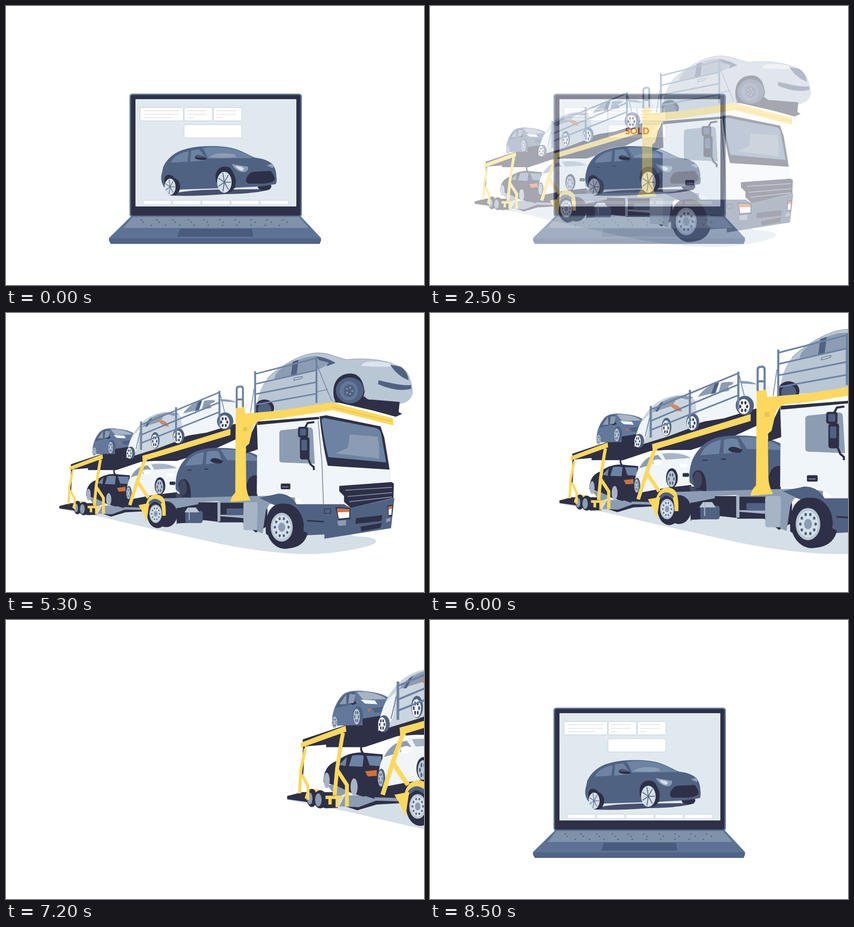
An HTML page that plays this animation: 917x611 px, repeating every 8.6 s.

```html
<!DOCTYPE html>
<html lang="en">
<head>
<meta charset="utf-8">
<title>Car sold and delivered</title>
<style>
html, body { margin: 0; width: 100%; height: 100%; overflow: hidden; background: #fff; }
svg { display: block; }
text { font: 900 20px Lato, sans-serif; fill: #cb5b26; }
</style>
</head>
<body>
<svg width="917" height="611" viewBox="0 0 917 611">
  <g id="laptop"></g>
  <g id="scene"><rect width="917" height="611" fill="#fff"/><g id="truck"></g></g>
</svg>
<script>
const NAVY = '#2e3047', BLUE = '#506282', MID = '#6c83a4', STEEL = '#8c9db3', GREY = '#a7b4c5',
  PALE = '#b9c6d4', MIST = '#d5dfe8', ICE = '#f0f5fa', YELLOW = '#fdd85c', ORANGE = '#d2703a';

// Shape helpers, each returning SVG markup
const area = (fill, d) => `<path fill="${fill}" d="${d}"/>`;
const line = (color, width, d) => `<path fill="none" stroke="${color}" stroke-width="${width}" stroke-linejoin="round" d="${d}"/>`;
const oval = (fill, x, y, rx, ry) => `<ellipse fill="${fill}" cx="${x}" cy="${y}" rx="${rx}" ry="${ry}"/>`;
const box = (fill, x, y, w, h, r = 0, stroke = 'none') =>
  `<rect x="${x}" y="${y}" width="${w}" height="${h}" rx="${r}" fill="${fill}" stroke="${stroke}"/>`;
const repeat = (n, fn) => Array.from({ length: n }, (_, i) => fn(i)).join('');
const ring = (n, x, y, rx, ry, fn) => repeat(n, i => {
  const a = i / n * 2 * Math.PI;
  return fn(x + rx * Math.cos(a), y + ry * Math.sin(a));
});
const spoked = (x, y, rx, ry) => oval(MIST, x, y, rx, ry) +
  ring(7, x, y, rx * .9, ry * .9, (px, py) => line(BLUE, rx / 9, `M${x} ${y}L${px} ${py}`));
const carRim = (x, y, rx, ry, rim = PALE, hole = BLUE) => oval(rim, x, y, rx, ry) +
  ring(6, x, y, rx * .58, ry * .58, (px, py) => oval(hole, px, py, rx * .17, ry * .22));
const truckRim = (x, y, rx, ry) => oval(PALE, x, y, rx, ry) + oval(MIST, x, y, rx * .82, ry * .82) +
  ring(10, x, y, rx * .62, ry * .62, (px, py) => oval(BLUE, px, py, rx * .1, ry * .1)) +
  oval(STEEL, x, y, rx * .32, ry * .32);
const rails = (x1, x2, pairs) => pairs.map(([a, b]) => line(MID, 3, `M${x1} ${a}L${x2} ${b}`)).join('');
const posts = list => list.map(([x, top, bottom]) => line(MID, 4, `M${x} ${top}V${bottom}`)).join('');

const panel = (x, y, w, h) => box('#fff', x, y, w, h, 3, '#c0cbd8');
const note = (x, w, indent, full, last) => panel(x, 222.5, w, 29) +
  line('#cbd2da', 1, `M${x + indent} 229.5h${full}m${-full} 7.5h${full}m${-full} 7.5h${last}`);
const keys = (x, y, step) => repeat(10, i => box('#596985', x + i * step, y, 4, 2.5, 1));

const screenCar =
  area('#474f6e', 'M358 415C378 405 420 403 460 402L581 401C560 408 520 412 480 412C440 415 400 417 358 415Z') +
  oval(NAVY, 567, 395, 15, 9) +
  area(BLUE, 'M345 352C352 337 366 323 385 316Q408 308 436 307C462 306 482 307 500 312C520 318 534 327 546 332Q573 335 585 347Q593 358 593 372Q595 384 592 390L560 395L504 398L380 402L348 398C340 388 339 376 342 366Z') +
  area(MID, 'M362 343C366 331 381 321 401 318L398 341Z M406 316L424 314Q433 325 439 338L404 341Z M431 311C462 306 488 309 510 317Q530 325 544 333L443 334Q438 320 431 311Z') +
  area(STEEL, 'M446 331C455 322 482 320 502 325L505 331Q475 334 446 331Z') +
  area(NAVY, 'M414 333C414 325 426 325 432 330L440 334L438 337Q418 338 414 333Z') +
  area(BLUE, 'M415 331Q420 326 427 328L433 332Z') +
  area(NAVY, 'M461 386C456 362 467 350 483 352C496 353 502 365 503 398L480 408Z M348 388Q345 373 354 370C369 367 374 383 376 402L355 411Z') +
  oval(NAVY, 486, 384, 18, 25) + spoked(479, 386, 16, 23) +
  oval(NAVY, 367, 396, 15, 19) + spoked(360, 396, 12, 18) +
  area(NAVY, 'M527 378Q533 364 543 363L581 361Q591 374 589 381Q585 388 560 389H532Q525 387 527 378Z') +
  area(STEEL, 'M495 346L531 352Q532 364 519 364Q503 361 495 346Z M572 349L584 345Q589 352 585 355Z') +
  area(MIST, 'M503 350L517 352Q526 357 517 361Q507 358 503 350Z');

laptop.innerHTML =
  box('#5d7294', 271, 192, 378, 270, 6) + box(NAVY, 274, 195, 372, 264, 4) + box('#e1e9f0', 284, 204, 353, 235, 1) +
  note(294, 95.5, 8, 78, 62) + note(391, 62.5, 6, 43, 14) + note(455, 62.5, 6, 43, 14) +
  panel(390.5, 260, 127, 29) + '<text id="label" x="428 439 455 466" y="281.3"></text>' +
  repeat(5, i => panel(300.8 + i * 64.2, 425.5, 62.5, 9.7)) + screenCar +
  area('#5d7294', 'M274 461H647L691 508V511H226V508Z') +
  area('#4f6488', 'M226 509H691V514L688 521H230L226 514Z') +
  area('#8092aa', 'M278 462H643L664 486H258Z') +
  keys(295, 467, 34.4) + keys(299, 472.5, 35.1) + keys(317, 479, 31.2) +
  area('#495c7c', 'M381 488H540L542 505H376Z');

const ground = area(MIST, 'M98 434L187 451L281 473L350 488L430 506Q540 528 620 528C670 528 748 514 758 504Q764 492 715 491L600 440L350 420L130 430Z');

const hatchback =
  area('#63799b', 'M167 320C166 300 173 284 183 273C190 266 206 265 218 267Q245 269 257 279L254 309L214 319Z') +
  area(BLUE, 'M172 293Q180 274 193 269L202 268L204 285Z M228 293L251 290L247 300L233 300Z') +
  area(NAVY, 'M214 309L252 303V314L214 319Z M193 285Q200 278 205 286L199 288Z') +
  area(STEEL, 'M178 287L189 272L189 287Z M192 286L194 271L203 272Q202 282 200 285Z') +
  area(GREY, 'M205 268Q235 267 251 279L215 280Z') +
  area(ICE, 'M211 280L233 281L237 287L218 286Z') + oval(ORANGE, 224, 296, 2, 2.5) +
  oval(BLUE, 207, 305, 8, 15) + carRim(205, 306, 5, 12) + carRim(171, 315, 4, 9);

const whiteUpper =
  area(ICE, 'M341 285C346 260 349 240 366 224C380 209 400 206 425 205Q469 204 490 214L492 226L464 257L405 275Z') +
  area(STEEL, 'M356 235Q372 213 396 208L390 227Z M400 209Q411 206 423 208L414 224L395 227Z M432 206Q454 204 467 212L438 210Z') +
  area(BLUE, 'M388 210L396 208L389 228L381 230Z') + oval('#fff', 424, 218, 11, 6) +
  oval(BLUE, 444, 251, 17, 18) + carRim(442, 253, 11, 14, ICE, NAVY);

const paleUpper =
  area('#cad5df', 'M238 328C240 300 249 278 266 258C283 239 305 232 326 232Q342 232 352 242L356 288L300 309Z') +
  area(STEEL, 'M270 264Q287 239 319 234L309 252Z M313 234Q335 231 349 236L336 240Z') +
  area(BLUE, 'M286 247L292 243L282 262L277 263Z') +
  area(ICE, 'M238 325Q241 300 251 282L265 268L262 305L250 328Z') +
  area('#cf8a62', 'M303 249Q321 247 327 262Q315 264 303 249Z') +
  oval(BLUE, 298, 291, 9, 17) + carRim(297, 293, 7, 14, ICE, NAVY) +
  oval(BLUE, 347, 282, 12, 16) + carRim(345, 284, 9, 13, ICE, NAVY) +
  oval(BLUE, 247, 317, 9, 13) + carRim(244, 318, 6, 11, ICE, NAVY);

const sedan =
  area(NAVY, 'M154 407C154 388 162 378 175 374Q191 361 212 361L245 364V412L216 429L198 424L174 412Z') +
  area(MID, 'M178 380L190 368L188 382Z M193 382L198 366Q208 364 216 366L214 383Z M220 366L243 367V382L225 381Z') +
  area(ORANGE, 'M218 390L236 388V397L222 398Z') +
  oval(GREY, 159, 404, 4.5, 12) + oval(GREY, 201, 414, 5.5, 13);

const suv =
  area(ICE, 'M238 402C239 375 250 353 270 343Q292 335 322 339Q344 341 351 352V395L310 402L246 414Z') +
  area(STEEL, 'M247 368Q256 350 271 345L268 362Z M274 345L282 343L289 352L272 361Z') +
  area(GREY, 'M290 341Q325 337 343 349L296 352Z') +
  area('#fff', 'M273 354Q282 348 291 355L285 362H274Z M322 359L339 361L334 367L323 366Z') +
  box(NAVY, 328, 377, 12, 7, 2) +
  oval(NAVY, 308, 386, 11, 18) + carRim(307, 388, 8, 15) +
  oval(BLUE, 243, 400, 6, 14) + carRim(242, 401, 4, 12);

const blueLower =
  area(BLUE, 'M341 394C339 365 346 346 361 330C378 312 398 307 430 307Q478 306 511 322V408L360 411Z') +
  area(MID, 'M361 344Q371 320 400 315L396 341Z M405 315Q419 311 430 314L439 337L404 341Z M434 310Q481 308 510 327V334L448 332Z') +
  area(NAVY, 'M413 333Q417 325 431 330L440 334L436 339Q417 340 413 333Z') +
  line(NAVY, 2, 'M365 353h9M400 351h9') +
  area(NAVY, 'M346 383Q350 370 361 372Q374 380 372 411L353 408Z') + oval('#40475f', 356, 390, 8, 16) +
  area(NAVY, 'M487 407Q486 360 511 364V407Z');

const topCar =
  area(PALE, 'M508 232C511 203 517 181 532 162C551 143 585 121 612 113Q642 104 670 115L697 123Q749 117 793 131Q824 139 830 163Q837 183 835 195C831 208 820 214 806 216L740 206L665 216L600 226Z') +
  line(STEEL, 1, 'M532 162C551 143 585 121 612 113Q642 104 670 115L697 123Q749 117 793 131') +
  area(STEEL, 'M546 163Q550 139 598 123Q626 111 650 119L665 128Q650 140 632 145L592 155Z') +
  area(BLUE, 'M585 127L597 123L593 154L581 157Z M634 116Q660 120 674 130L655 137L660 129L640 124Z') +
  line(BLUE, 1, 'M587 166Q586 161 594 160L605 158Q606 162 600 163L589 166Z') +
  area('#dce5ec', 'M728 136Q731 126 755 127Q785 127 803 137Q765 139 728 136Z') +
  area(BLUE, 'M788 133L811 138Q825 149 827 166Q803 157 788 133Z M764 166C790 172 815 178 832 176V184Q800 191 763 174Z') +
  area(NAVY, 'M670 210L735 200Q742 208 748 206L808 211L806 232L813 236L800 242L752 229Z') +
  area(NAVY, 'M671 203C665 171 681 151 708 152Q731 154 735 190L730 212H675Z') +
  oval(BLUE, 704, 187, 29, 27) + oval('#64789a', 702, 188, 19, 20) + oval(BLUE, 703, 188, 12, 13) +
  ring(5, 703, 188, 6, 7, (x, y) => oval(PALE, x, y, 1.2, 1.4)) +
  oval(NAVY, 526, 224, 20, 18) + oval(BLUE, 526, 227, 14, 14);

const decks =
  area(NAVY, 'M122 341L188 319L262 302L276 323L268 336L217 353L158 353V349L122 352Z') +
  line(NAVY, 3, 'M213 350Q210 358 215 362') +
  area(NAVY, 'M238 330L300 302L455 254L468 258V288L420 310L343 334L295 334L268 336Z');

const trailer =
  area(NAVY, 'M98 428L121 422L172 422L176 446L157 447L127 437L98 433Z M188 444L214 428L272 424V439L236 441L206 450Z M216 429L240 405L270 390L310 403L344 399L345 412L290 425L235 432Z') +
  area('#444c68', 'M340 402L511 401V415L345 416Z') +
  area(STEEL, 'M160 412L188 404L195 422L175 430Z M178 444L187 427L215 427L238 434L208 445Z M232 430L268 431V436L234 435Z') +
  line(YELLOW, 4, 'M127 432Q130 416 140 420Q149 417 155 430') +
  oval(NAVY, 136, 431, 8, 14) + oval(STEEL, 133, 432, 4, 9) +
  oval(NAVY, 149, 433, 10, 14) + oval(STEEL, 146, 434, 5, 10) +
  line(YELLOW, 5, 'M157 430H182M164 431V441M175 429V445');

const frame =
  area(YELLOW, 'M119 346L188 320L189 329L119 354Z') + line(NAVY, 3, 'M124 352L121 398') +
  line(YELLOW, 4.5, 'M126 355L119 388L117 424M121 395L130 413V434') +
  line(YELLOW, 6, 'M184 331L182 341L175 385L171 427M175 388L190 411V444') +
  area(YELLOW, 'M271 323L300 315L455 267V280L280 332L272 334Z') +
  line(YELLOW, 7, 'M279 331Q274 335 272 344L261 375L245 426M262 378L271 392L284 411');

const chassis =
  area(NAVY, 'M342 420H432V461L396 457L343 466Z M430 416H532V470L508 483L480 462L430 462Z') +
  area(MIST, 'M344 464L396 462L392 470L344 472Z') +
  area(STEEL, 'M312 412L540 406L590 410V424H530L484 421H430V418L388 420V424L346 432H316Z') +
  area(GREY, 'M428 418H434V460H428Z M434 446H482V453L434 449Z') +
  box(BLUE, 447, 433, 35, 14, 2) + box(NAVY, 343, 435, 54, 28, 5) + box(BLUE, 361, 438, 36, 25, 4) +
  area(PALE, 'M359 441L366 431H383L390 441Z') + line(GREY, 2, 'M369 431V457') +
  oval(NAVY, 321, 445, 23, 27) + oval(NAVY, 303, 444, 22, 30) + truckRim(299, 444, 13, 19) +
  area(YELLOW, 'M263 426L279 423C284 405 299 399 312 408Q321 414 320 448H313Q313 428 306 417Q291 410 285 427L280 461L273 443Z') +
  line(BLUE, 6, 'M286 423Q297 409 310 423') + box(GREY, 482, 420, 30, 58, 4) +
  area(STEEL, 'M512 420L544 411L529 437L522 485L510 480Z');

const cab =
  area(ICE, 'M511 253L640 244L660 238L768 262L787 330L791 382L706 432L610 425Q590 402 555 403H510Z') +
  area(NAVY, 'M511 252L640 242V247L511 259Z M641 241L655 239L768 262L776 285L787 352L658 344Q647 300 641 241Z') +
  area(MID, 'M645 249Q647 244 653 245L757 265Q767 267 769 276L780 337L659 326Q650 290 645 249Z') +
  area(STEEL, 'M674 318L700 307L704 279L762 283Q767 306 765 329Z') +
  area(STEEL, 'M562 270L619 264Q626 264 627 270L631 340L562 337Q557 337 557 331V276Q557 271 562 270Z') +
  line(BLUE, 1.2, 'M638 250L646 340L649 424') +
  line(NAVY, 4, 'M610 266L616 255L630 253M617 328L622 341L629 347V353') +
  box(NAVY, 596, 263, 21, 22, 4) + box(NAVY, 600, 284, 20, 47, 5) +
  box(BLUE, 600, 267, 13, 14, 2) + box(BLUE, 603, 290, 12, 22, 2) +
  box(NAVY, 560, 381, 20, 12, 2) + line(STEEL, 1.5, 'M563 388h13') +
  area(BLUE, 'M515 411L555 402Q580 402 593 424H692L706 432L797 411L790 474L651 496V487L608 489L590 445L545 425Z') +
  area(NAVY, 'M682 386L791 378L796 381L795 411L706 432L692 419V407L682 397Z') +
  line(STEEL, 1.5, 'M695 395L792 389M699 408L793 400M703 419L792 409') +
  area(NAVY, 'M717 453L772 447L770 459L716 465Z M726 471L771 463L768 473L728 481Z M614 457L650 459V462L616 460Z') +
  line(NAVY, 1.2, 'M651 434H664V443H651Z') +
  area(NAVY, 'M674 430L705 432V455L680 457Z M783 427L794 425L792 449L784 450Z') +
  area('#fff', 'M677 433L703 434V452L681 454Z M785 429L792 428L791 446L785 447Z') +
  area(ORANGE, 'M677 433L703 434V440L678 441Z M785 429L792 428V433L785 435Z') +
  area(STEEL, 'M678 459L696 457V468L680 469Z M780 455L789 452V459L780 462Z') +
  area(NAVY, 'M529 486C526 443 540 422 564 423Q600 430 607 480L616 484Q610 512 578 516Z') +
  oval(NAVY, 569, 470, 39, 47) + truckRim(562, 472, 23, 30);

const gantry =
  area(NAVY, 'M487 300L510 253L512 310L488 318Z') +
  area(YELLOW, 'M466 224L484 222L486 235L560 229L665 212L794 245L795 260L668 228L560 245L520 249Q505 253 502 264L494 298L487 304L488 385Q489 403 497 416L455 419Q456 408 465 400Z') +
  area('#e9c654', 'M481 263h9v9h-9z') + line('#d9b44a', 1, 'M668 222L793 252');

const guards =
  posts([[268.5, 252, 311], [341.5, 222, 292], [432, 188, 259], [506.5, 147, 234], [634.5, 116, 213]]) +
  rails(268, 432, [[259, 191], [280, 212], [297, 232]]) +
  rails(506, 634, [[153, 120], [174, 145], [195, 170], [217, 194]]) +
  line(MID, 1.5, 'M636 135L658 190L667 209M636 190L658 185M504 184L497 233M434 196L443 233M266 275L258 309') +
  line(MID, 4, 'M468 224V185Q468 179 474 179Q481 178 481 184V222M468 206H481');

truck.innerHTML = ground + decks + hatchback + whiteUpper + paleUpper + topCar + trailer +
  sedan + suv + blueLower + chassis + cab + frame + gantry + guards;

// Truck drives off, gaining speed and size, in steps of 100 ms
function drive(step) {
  if (step < 1) return '';
  const square = step * step - 1;
  const left = 117 + 22 * (step - 1) + .205 * square;
  const scale = 1.0515 + .0162 * (step - 1) + .000165 * square;
  return `translate(${left - 98 * scale} ${528 * (1 - scale)}) scale(${scale})`;
}

const clamp = (v, max) => Math.max(0, Math.min(max, v));
const steps = (t, start, every, max) => clamp(Math.floor((t - start) / every) + 1, max);

function draw() {
  const t = performance.now() % 8600;
  label.textContent = 'SOLD'.slice(0, t < 8000 ? steps(t, 1000, 200, 4) : 0);
  scene.setAttribute('opacity', steps(t, 2100, 200, 7) / 7 - steps(t, 8000, 100, 6) / 6);
  truck.setAttribute('transform', drive(steps(t, 5300, 100, 27)));
  requestAnimationFrame(draw);
}
draw();
</script>
</body>
</html>
```
